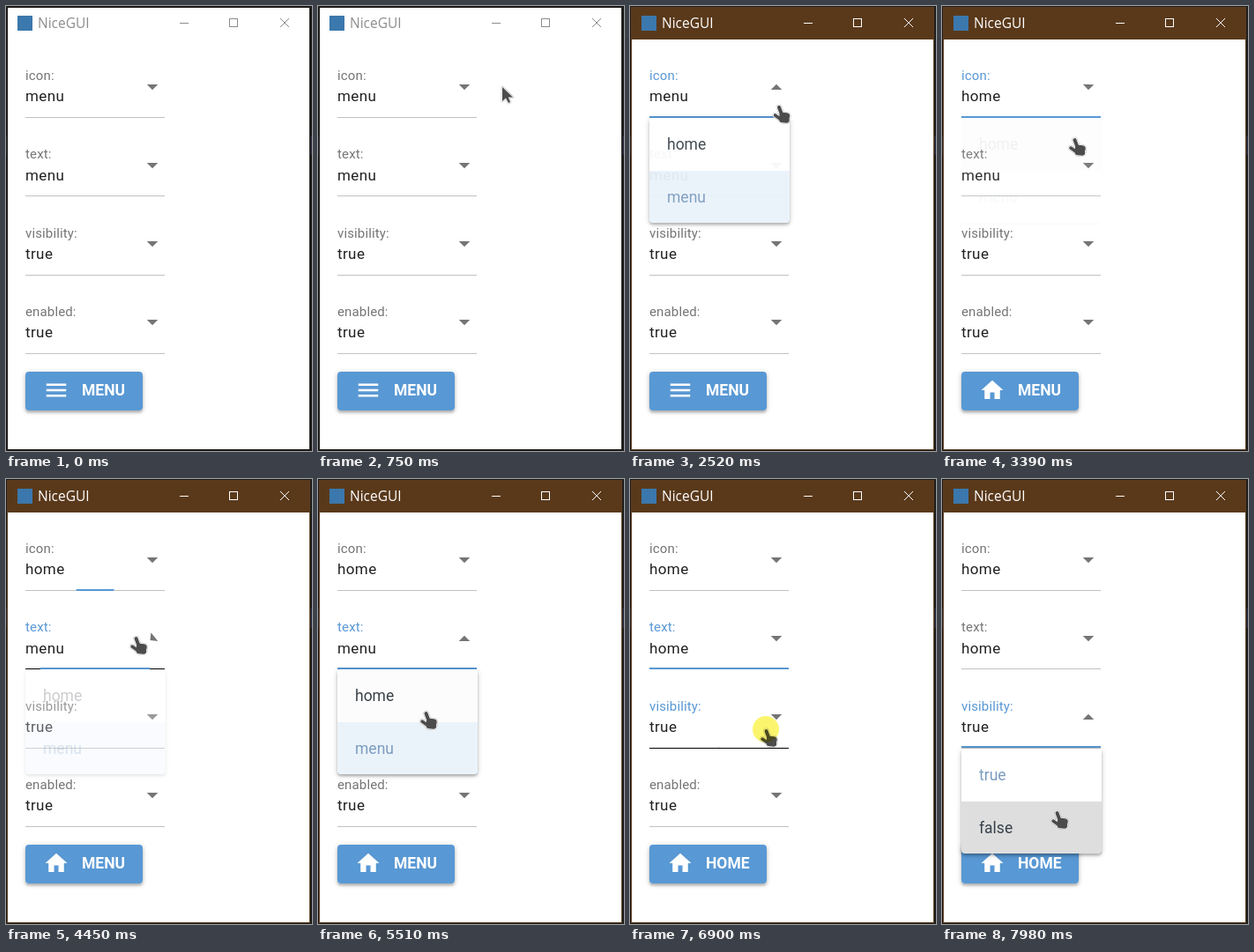
An HTML page with a canvas that plays this animation: 347 by 505 pixels, repeating every 8 s.

```html
<!DOCTYPE html>
<html lang="en">
<head>
<meta charset="utf-8">
<title>NiceGUI</title>
<style>
html, body { margin: 0; width: 100%; height: 100%; overflow: hidden; background: #1f1f1f; }
canvas { display: block; width: 347px; height: 505px; }
</style>
</head>
<body>
<canvas id="stage"></canvas>
<script>
const W = 347, H = 505, LOOP = 8000;
const LEFT = 22, WIDTH = 158, ROW = 89.3;
const BLUE = '#5898d4', INK = '#212121', GREY = '#757575';
const ROBOTO = 'Roboto, Arial, sans-serif';
const ACTIVATE = 800;

const canvas = document.getElementById('stage');
const ctx = canvas.getContext('2d');
const dpr = window.devicePixelRatio || 1;
canvas.width = W * dpr;
canvas.height = H * dpr;

// focus, close and hop (to the other option) are times; pick is the option chosen
const fields = [
  { label: 'icon:', options: ['home', 'menu'], value: 1, pick: 0, focus: 2180, hop: 2700, close: 3195 },
  { label: 'text:', options: ['home', 'menu'], value: 1, pick: 0, focus: 4268, hop: 5470, close: 5880 },
  { label: 'visibility:', options: ['true', 'false'], value: 0, pick: 1, focus: 6890, hop: 7620, close: Infinity },
  { label: 'enabled:', options: ['true', 'false'], value: 0, pick: 1, focus: Infinity, hop: Infinity, close: Infinity }
];
fields.forEach((f, i) => {
  f.row = i;
  f.open = f.focus + 140;
  f.blur = i < 3 ? fields[i + 1].focus + 15 : Infinity;
});

const presses = [ACTIVATE, ...fields.flatMap(f => [f.focus, f.close - 130])];

// pointer moves: start, duration, then the place reached
const entry = [272, 514];
const moves = [
  [20, 700, 209, 92],
  [1540, 100, 172, 106],
  [2360, 640, 150, 150],
  [3390, 300, 213, 90],
  [3690, 530, 147, 179],
  [4470, 320, 126, 283],
  [5420, 90, 122, 264],
  [5980, 420, 172, 285],
  [6460, 360, 154, 284],
  [7080, 720, 130, 377]
];

const clamp = v => Math.min(1, Math.max(0, v));
const lerp = (a, b, k) => a + (b - a) * k;
const smooth = k => k * k * (3 - 2 * k);

function bezier(x1, y1, x2, y2) {
  const at = (a, b, s) => 3 * a * s * (1 - s) ** 2 + 3 * b * s * s * (1 - s) + s ** 3;
  return x => {
    let lo = 0, hi = 1;
    for (let i = 0; i < 20; i++) {
      const mid = (lo + hi) / 2;
      if (at(x1, x2, mid) < x) lo = mid; else hi = mid;
    }
    return x <= 0 ? 0 : x >= 1 ? 1 : at(y1, y2, lo);
  };
}
const standard = bezier(.4, 0, .2, 1);
const fade = bezier(.215, .61, .305, 1);
const ease = bezier(.25, .1, .25, 1);

// rises from start, falls again from end
const pulse = (t, start, end, ms, curve) =>
  curve(clamp((t - start) / ms)) - curve(clamp((t - end) / ms));

function rect(color, x, y, w, h) {
  ctx.fillStyle = color;
  ctx.fillRect(x, y, w, h);
}

function text(str, x, y, font, color, spacing = 0) {
  ctx.font = font;
  ctx.letterSpacing = spacing + 'px';
  ctx.fillStyle = color;
  ctx.fillText(str, x, y);
}

function poly(points) {
  ctx.beginPath();
  for (const [x, y] of points) ctx.lineTo(x, y);
  ctx.closePath();
}

// the shadow is kept outside the shape so that translucent cards stay clean
function card(color, x, y, w, h) {
  const shape = new Path2D(), outside = new Path2D();
  shape.roundRect(x, y, w, h, 4);
  outside.rect(0, 0, W, H);
  outside.addPath(shape);
  ctx.save();
  ctx.clip(outside, 'evenodd');
  ctx.fillStyle = '#000';
  for (const [drop, blur, alpha] of [[1.25, 6.25, .2], [2.5, 2.5, .2]]) {
    ctx.shadowColor = `rgba(0,0,0,${alpha})`;
    ctx.shadowBlur = blur * dpr;
    ctx.shadowOffsetY = (drop + H) * dpr;
    ctx.save();
    ctx.translate(0, -H);
    ctx.fill(shape);
    ctx.restore();
  }
  ctx.restore();
  ctx.fillStyle = color;
  ctx.fill(shape);
}

function windowFrame(t) {
  const on = clamp((t - ACTIVATE) / 120);
  rect('#1f1f1f', 0, 0, W, H);
  rect('#2b2d3a', 0, 147, W, 22);
  rect('#17130f', 1, 1, 344, 503);
  ctx.globalAlpha = on;
  rect('#5a391b', 1, 1, 344, 503);
  ctx.globalAlpha = 1;
  rect('#fff', 2, 38, 342, 465);
  ctx.globalAlpha = 1 - on;
  rect('#fff', 2, 2, 342, 36);
  ctx.globalAlpha = 1;
  rect('#3b78ad', 13, 11, 17, 17);

  const shade = Math.round(lerp(140, 255, on));
  const color = `rgb(${shade},${shade},${shade})`;
  text('NiceGUI', 36, 25, '15.5px "Open Sans", "Noto Sans", sans-serif', color);
  rect(color, 197, 19, 10, 1);
  ctx.strokeStyle = color;
  ctx.lineWidth = 1;
  ctx.strokeRect(253.5, 14.5, 9, 9);
  ctx.beginPath();
  for (const side of [-5, 5]) {
    ctx.moveTo(316 - side, 14);
    ctx.lineTo(316 + side, 24);
  }
  ctx.stroke();
}

function field(f, t) {
  const top = f.row * ROW;
  const near = Math.round(top), above = Math.floor(top), below = Math.ceil(top);
  const focused = t >= f.focus && t < f.blur;
  const value = f.options[t < f.close ? f.value : f.pick];
  text(f.label, LEFT, 84 + near, '15px ' + ROBOTO, focused ? BLUE : GREY, .14);
  text(value, LEFT, 108 + below, '17px ' + ROBOTO, INK, .4);

  ctx.save();
  ctx.translate(166, 92 + above);
  ctx.rotate(Math.PI * pulse(t, f.open, f.close, 220, ease));
  ctx.fillStyle = GREY;
  poly([[-6.25, -3], [6.25, -3], [0, 3.25]]);
  ctx.fill();
  ctx.restore();

  rect('#c2c2c2', LEFT, 126 + near, WIDTH, 1);
  ctx.globalAlpha = pulse(t, f.focus - 400, f.focus + 400, 360, standard);
  rect('#000', LEFT, 126 + near, WIDTH, 1);
  ctx.globalAlpha = 1;
  const w = WIDTH * pulse(t, f.focus, f.blur, 360, standard);
  rect(BLUE, LEFT + (WIDTH - w) / 2, 125 + above, w, 2);
}

function popup(f, t) {
  const alpha = pulse(t, f.open + 15, f.close + 15, 300, fade);
  if (alpha <= 0) return;
  const y = 127 + Math.round(f.row * ROW);
  const moved = ease(clamp((t - f.hop) / 400));
  ctx.globalAlpha = alpha;
  card('#fff', LEFT, y, WIDTH + 1, 119);
  f.options.forEach((name, i) => {
    const chosen = i === f.value;
    ctx.globalAlpha = alpha * .13 * (i === f.pick ? moved : 1 - moved);
    rect(chosen ? BLUE : '#000', LEFT, y + i * 60, WIDTH + 1, 60 - i);
    ctx.globalAlpha = alpha;
    text(name, 42, y + 35.5 + i * 60, '17.5px ' + ROBOTO, chosen ? '#7b9cbf' : '#37414a');
  });
  ctx.globalAlpha = 1;
}

function menuIcon() {
  for (let i = 0; i < 3; i++) rect('#fff', -9, -6 + i * 5, 18, 2);
}

function homeIcon() {
  const half = [[0, -9], [10, 0], [7, 0], [7, 8], [2, 8], [2, 2]];
  const mirrored = half.slice(1).reverse().map(([x, y]) => [-x, y]);
  poly([...half, ...mirrored]);
  ctx.fillStyle = '#fff';
  ctx.fill();
}

function button(t) {
  card(BLUE, LEFT, 415, 133, 44);
  ctx.save();
  ctx.translate(57, 436);
  ctx.scale(1.25, 1.25);
  if (t < fields[0].close) menuIcon(); else homeIcon();
  ctx.restore();
  text(t < fields[1].close ? 'MENU' : 'HOME', 86, 442, '600 17.5px ' + ROBOTO, '#fff');
}

function pointerAt(t) {
  let [x, y] = entry;
  for (const [start, ms, toX, toY] of moves) {
    const k = smooth(clamp((t - start) / ms));
    x = lerp(x, toX, k);
    y = lerp(y, toY, k);
  }
  return [x, y];
}

function line(x1, y1, x2, y2, width) {
  ctx.lineWidth = width;
  ctx.beginPath();
  ctx.moveTo(x1, y1);
  ctx.lineTo(x2, y2);
  ctx.stroke();
}

function hand(color, grow) {
  ctx.strokeStyle = color;
  line(.5, 2, 3.5, 10, 4 + grow);
  line(-4, 11, 3, 16, 3.5 + grow);
  line(4.5, 11.5, 9, 12, 7.5 + grow);
  line(4, 16, 9, 16.5, 6.5 + grow);
}

function arrow(color, grow) {
  poly([[0, 0], [0, 16], [4, 12.4], [7, 18], [9, 17], [6.8, 11.4], [12, 11.4]]);
  ctx.strokeStyle = ctx.fillStyle = color;
  ctx.lineWidth = grow + .1;
  ctx.stroke();
  ctx.fill();
}

function pointer(t) {
  const [x, y] = pointerAt(t);
  const shape = x > LEFT + WIDTH ? arrow : hand;
  ctx.save();
  ctx.translate(x, y);
  ctx.lineJoin = ctx.lineCap = 'round';
  shape('rgba(150,150,150,.6)', 2.6);
  shape('#fff', 1.6);
  shape('#4c4c4c', 0);
  if (presses.some(p => t >= p && t < p + 130)) {
    ctx.globalCompositeOperation = 'multiply';
    ctx.fillStyle = '#fbf56e';
    ctx.beginPath();
    ctx.arc(0, 0, 15, 0, 2 * Math.PI);
    ctx.fill();
  }
  ctx.restore();
}

function draw(t) {
  ctx.setTransform(dpr, 0, 0, dpr, 0, 0);
  windowFrame(t);
  for (const f of fields) field(f, t);
  button(t);
  for (const f of fields) popup(f, t);
  pointer(t);
}

const start = performance.now();
function tick() {
  draw((performance.now() - start) % LOOP);
  requestAnimationFrame(tick);
}
tick();
</script>
</body>
</html>
```
